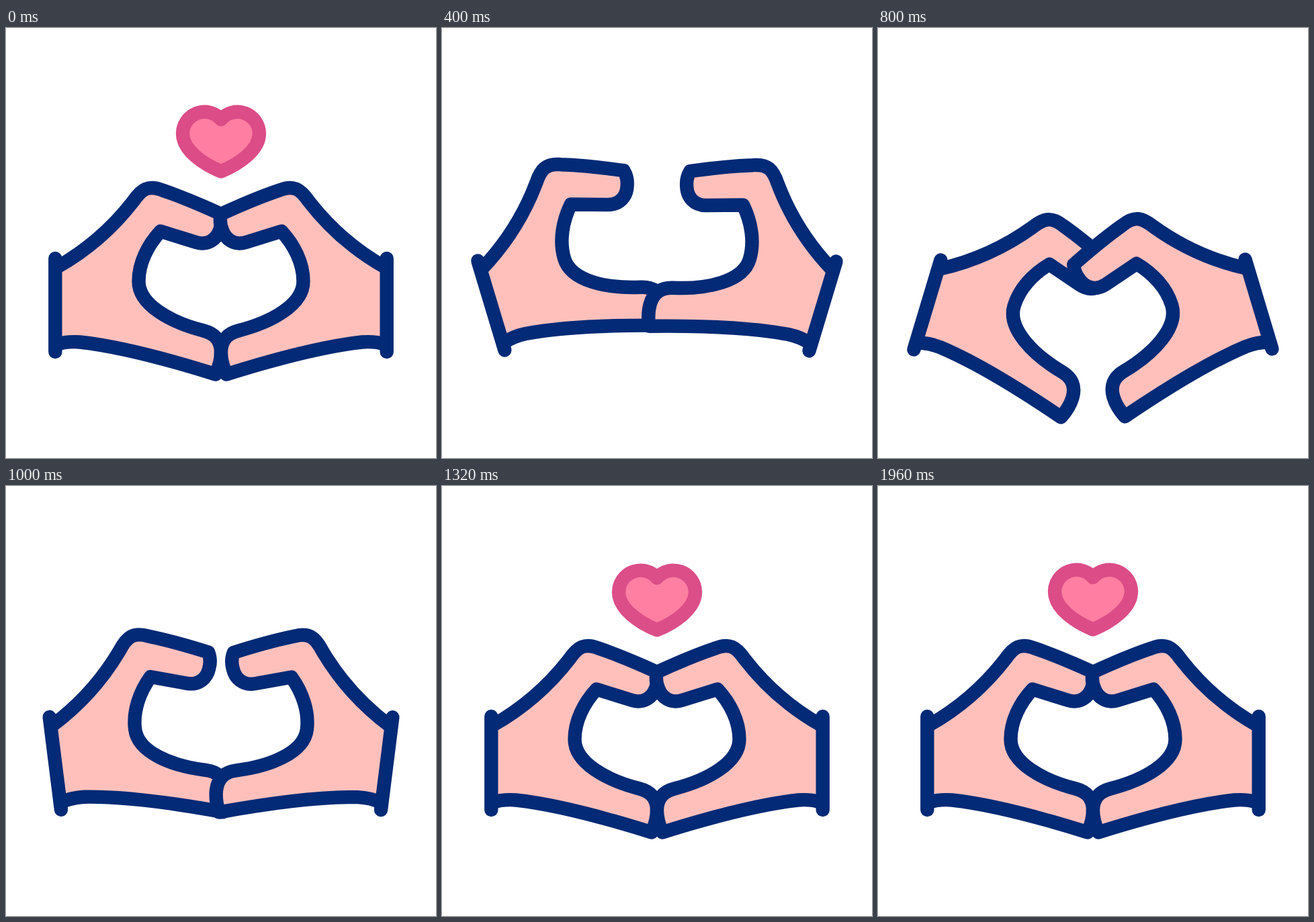
Animation of 640x640 px, one loop 2000 ms. Source, as an HTML page:

```html
<!DOCTYPE html>
<html lang="en">
<head>
<meta charset="utf-8">
<title>Heart hands</title>
<style>
  html, body { margin: 0; height: 100%; overflow: hidden; background: #fff; }
  svg { display: block; width: 100vw; height: 100vh; }
  path { stroke-width: 20.4; stroke-linecap: round; stroke-linejoin: round; }
  .hand { fill: #ffc0bc; stroke: #032a76; }
  #heart { fill: #ff7ea1; stroke: #dc4c87; }
</style>
</head>
<body>
<svg viewBox="0 0 640 640">
  <defs>
    <g id="shape">
      <path d="M76 356C120 331 157 300 190 257C202 240 212 233 233 241.500Q270 254 320 277
        Q323 289 318 301C313 315 300 324 283 319L230 302.500
        C211 323 197.500 350 197.500 377C197.500 412 245 438 294 450.500
        Q320 457 320 483Q320 498 312 515.500C250 496 170 474 110 467.500Q91 466 75 471"/>
      <path d="M73.300 343V482"/>
    </g>
  </defs>
  <path id="heart" d="M320 136A32.500 32.500 0 0 0 263 157C263 182 294 203 320 213.500
    C346 203 377 182 377 157A32.500 32.500 0 0 0 320 136Z"/>
  <use id="left" class="hand" href="#shape"/>
  <g transform="translate(640) scale(-1 1)">
    <use id="right" class="hand" href="#shape"/>
  </g>
</svg>
<script>
  const LOOP = 2000;
  const [heart, left, right] = ['heart', 'left', 'right'].map(id => document.getElementById(id));

  // Sine ease from 0 to 1 between two times.
  function ease(t, start, end) {
    const p = Math.min(1, Math.max(0, (t - start) / (end - start)));
    return (1 - Math.cos(Math.PI * p)) / 2;
  }

  function draw() {
    const t = performance.now() % LOOP;

    // The hands swing up, down and half way up, then settle.
    const angle = -18 * ease(t, 0, 352) + 36 * ease(t, 352, 764)
      - 25.5 * ease(t, 764, 1020) + 7.5 * ease(t, 1020, 1320);
    left.setAttribute('transform', `rotate(${angle} 75 412.5)`);
    right.setAttribute('transform', `rotate(${angle} 78.5 412.5)`);

    // The heart leaves upwards and returns from below.
    const out = ease(t, 0, 375), back = ease(t, 1020, 1345);
    const y = t < LOOP / 2 ? -60 * out : 60 * (1 - back);
    heart.setAttribute('transform', `translate(0 ${y})`);
    heart.setAttribute('opacity', 1 - out + back);

    requestAnimationFrame(draw);
  }
  draw();
</script>
</body>
</html>
```
